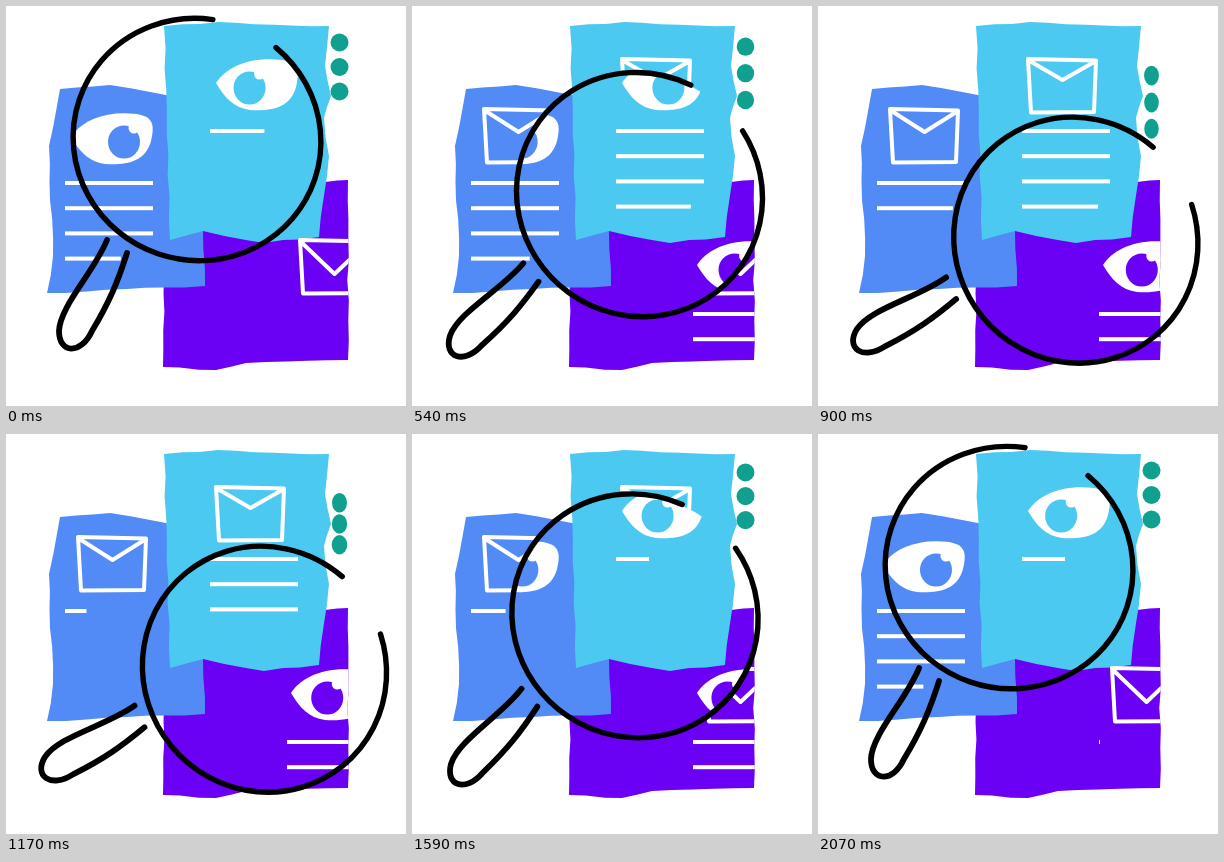
These frames come from a looping animation (400 px wide and 400 px high, 2100 ms). An HTML page with a canvas:

```html
<!DOCTYPE html>
<html lang="en">
<head>
<meta charset="utf-8">
<title>Magnifier over documents</title>
<style>
html, body { margin: 0; width: 100%; height: 100%; overflow: hidden; background: #fff; }
canvas { display: block; width: 400px; height: 400px; }
</style>
</head>
<body>
<canvas id="stage" width="400" height="400"></canvas>
<script>
const ctx = document.getElementById('stage').getContext('2d');
const LOOP = 2100, HALF = LOOP / 2, STEP = 30, TAU = Math.PI * 2;
const LINE = { length: 88, gap: 25.2, count: 4 };

// Cubic timing curve with control points (a, 0) and (b, 1).
function ease(x, a = .567, b = .433) {
  let lo = 0, hi = 1;
  for (let i = 0; i < 24; i++) {
    const s = (lo + hi) / 2, r = 1 - s;
    if (3 * a * s * r * r + 3 * b * s * s * r + s * s * s < x) lo = s; else hi = s;
  }
  return lo * lo * (3 - 2 * lo);
}

// Rise over the first half of the loop, fall over the second.
function swing(t, start, fallB) {
  const x = ((t - start) % LOOP + LOOP) % LOOP / HALF;
  return x < 1 ? ease(x) : 1 - ease(x - 1, .567, fallB);
}

const wave = (t, peak) => Math.cos(TAU * (t - peak) / LOOP);

let seed = 7;
const jitter = size => ((seed = seed * 16807 % 2147483647) / 2147483647 - .5) * 2 * size;

// Torn paper: straight edges broken into short, slightly shifted pieces.
function paper(corners) {
  const p = new Path2D();
  corners.forEach(([x, y], i) => {
    const [u, v] = corners[(i + 1) % corners.length];
    const n = Math.ceil(Math.hypot(u - x, v - y) / 22);
    p.lineTo(x, y);
    for (let k = 1; k < n; k++) {
      p.lineTo(x + (u - x) * k / n + jitter(1), y + (v - y) * k / n + jitter(1));
    }
  });
  p.closePath();
  return p;
}

// Each card: anchors of its lines, envelope and eye, and the pupil's sway.
const cards = [
  {
    color: '#6a00f4', start: 0, line: [281, 308], mail: [294, 234], flap: 33, eye: [285, 182 + 53],
    pupil: t => 319 + 5 * wave(t, 800),
    path: paper([[180, 200], [319, 176], [342, 174], [342, 354], [240, 357], [210, 364], [157, 361], [158, 270]])
  },
  {
    color: '#528bf5', start: 1316, line: [59, 177], mail: [72, 103], flap: 22, eye: [65, 107],
    pupil: t => 110 + 8 * wave(t, 0),
    path: paper([[54, 83], [104, 79], [165, 90], [197, 225], [199, 280], [41, 287], [47, 250], [43, 140]])
  },
  {
    color: '#4cc9f0', start: 1770, line: [204, 125], mail: [210, 53], flap: 20, eye: [210, 53],
    pupil: t => 251 - 9 * wave(t, -200),
    path: paper([[158, 20], [212, 16], [323, 20], [319, 60], [325, 90], [318, 112], [323, 150], [313, 231],
      [258, 237], [197, 225], [164, 234]])
  }
];

const almond = new Path2D('M0 24C10 8 34-3 66 1C84 4 83 14 80 28C74 50 54 52 34 51C18 49 8 38 0 24Z');
const handle = new Path2D('M101 234C88 266 54 300 53 325C53 348 75 349 86 325C104 295 112 275 121 247');

// The lens is a tilted oval, left open at the upper right.
function oval(from, to, grow = 0) {
  const p = new Path2D();
  p.ellipse(191, 133.5, 124.3 + grow, 120.8 + grow, .35, from, to);
  return p;
}
const ring = oval(-1.22, 4.5), lens = oval(0, TAU, -1);

function stroke(path, width, color, cap) {
  ctx.lineWidth = width;
  ctx.strokeStyle = color;
  ctx.lineCap = cap;
  ctx.lineJoin = 'round';
  ctx.stroke(path);
}

function disc(x, y, rx, ry, color) {
  ctx.fillStyle = color;
  ctx.beginPath();
  ctx.ellipse(x, y, rx, ry, 0, 0, TAU);
  ctx.fill();
}

function drawLines({ line: [x, y], start }, t) {
  const shown = swing(t, start, .66) * LINE.length * LINE.count;
  ctx.fillStyle = '#fff';
  for (let i = 0; i < LINE.count; i++) {
    const w = Math.min(LINE.length, shown - i * LINE.length);
    if (w > .3) ctx.fillRect(x, y + i * LINE.gap - 2, w, 4);
  }
}

function drawMail({ mail: [x, y], flap }) {
  const p = new Path2D(`M${x} ${y}l68 1.5l-2 51.5l-63 .5Zv1l34.5 ${flap}L${x + 68} ${y + 2}`);
  stroke(p, 4, '#fff', 'round');
}

function drawEye({ eye: [x, y], color, pupil }, t) {
  ctx.save();
  ctx.translate(x, y);
  ctx.fillStyle = '#fff';
  ctx.fill(almond);
  ctx.restore();
  disc(pupil(t), y + 29, 16, 16.5, color);
  disc(pupil(t) + 10, y + 15, 5.5, 5.5, '#fff');
}

function clipped(paths, draw) {
  ctx.save();
  paths.forEach(p => ctx.clip(p, 'evenodd'));
  draw();
  ctx.restore();
}

function drawDots(t) {
  for (let i = 0; i < 3; i++) {
    const k = ((1 + wave(t, 1030 - 40 * i)) / 2) ** 3.7;
    disc(333.5, 36.5 + 24.5 * i + 38 * k, 9 - 1.8 * k, 9 + k, '#10a090');
  }
}

function draw(t) {
  ctx.fillStyle = '#fff';
  ctx.fillRect(0, 0, 400, 400);

  const k = swing(t, 0, .433);
  const pose = new DOMMatrix()
    .translate(191 + 69.9 * k, 131 + 103.7 * k).rotate(33 * k).translate(-191, -131);
  const inside = new Path2D();
  inside.addPath(lens, pose);
  const outside = new Path2D(inside);
  outside.rect(-100, -100, 700, 700);

  for (const card of cards) {
    ctx.fillStyle = card.color;
    ctx.fill(card.path);
  }
  for (const card of cards) {
    clipped([card.path], () => drawLines(card, t));
    clipped([card.path, outside], () => drawMail(card));
    clipped([card.path, inside], () => drawEye(card, t));
  }
  drawDots(t);

  ctx.save();
  ctx.setTransform(pose);
  stroke(ring, 5.4, '#000', 'round');
  stroke(handle, 5.8, '#000', 'round');
  ctx.restore();
}

const begin = performance.now();
function tick() {
  const t = (performance.now() - begin) % LOOP;
  draw(Math.floor(t / STEP) * STEP);
  requestAnimationFrame(tick);
}
tick();
</script>
</body>
</html>
```
